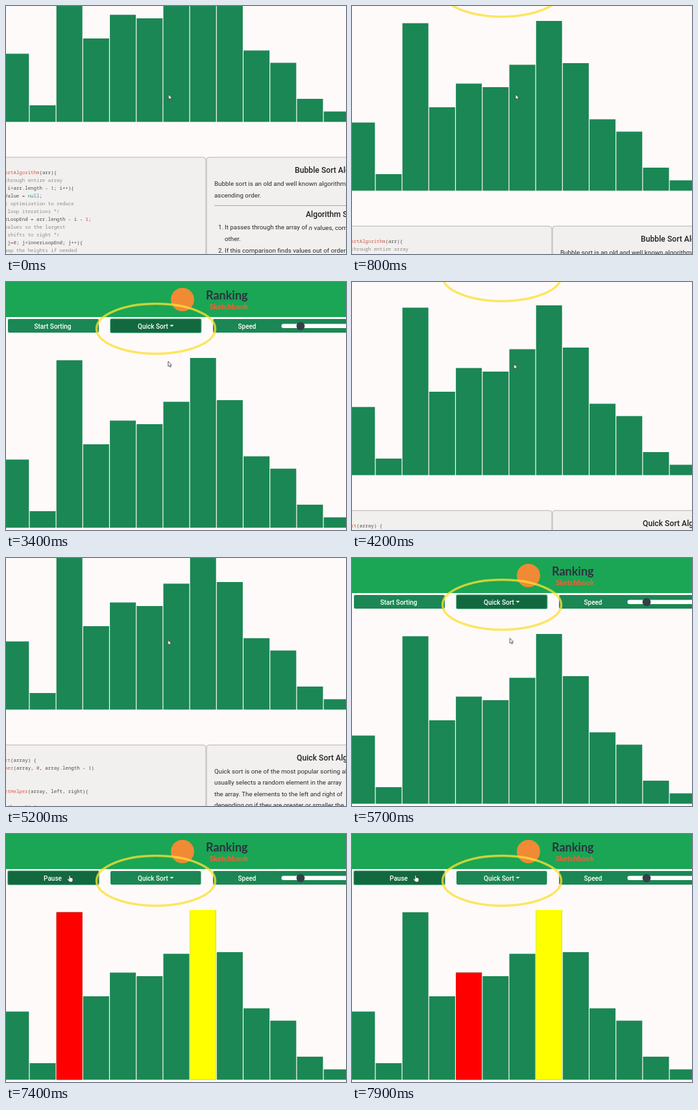
Recreate the animation shown at these times as an HTML page. Size 524 by 382 pixels, loop 8000 ms.

```html
<!DOCTYPE html>
<html lang="en">
<head>
<meta charset="utf-8">
<title>Sorting demo</title>
<style>
html, body { margin: 0; width: 100%; height: 100%; overflow: hidden; background: #fffafa; }
svg { display: block; width: 524px; height: 382px; }
text { font-family: Roboto, sans-serif; white-space: pre; dominant-baseline: central; }
.btn { fill: #1b8754; }
.dark { fill: #12693f; stroke: #1b8754; stroke-opacity: .5; stroke-width: 2; }
.label { font-size: 10px; font-weight: 500; fill: #fff; text-anchor: middle; }
.menu text { font: 7.8px "Open Sans", sans-serif; fill: #33383d; }
.card { fill: #f1f0ee; stroke: #b4b4b2; }
.code text { font: 7.42px "Noto Sans Mono", monospace; fill: #4a4a4a; }
.code .note { fill: #8b8b8b; }
.code .name { fill: #cf5a45; }
.code .num { fill: #b0358c; }
.code .null { fill: #2d8c9c; }
.title { font-size: 12.2px; font-weight: 500; fill: #222; }
.body { font-size: 9.8px; fill: #2b2b2b; }
</style>
</head>
<body>
<svg viewBox="0 0 524 382">
  <g id="page">
    <rect width="524" height="54" fill="#1aa654"/>
    <circle cx="272" cy="27" r="18" fill="#f08a35"/>
    <text x="308" y="20" style="font:700 18px Lato,sans-serif" fill="#2b3340">Ranking</text>
    <text x="314" y="37" style="font:700 11.3px Lato,sans-serif" fill="#f0623c">Sketchbook</text>

    <rect class="btn" x="3" y="57" width="140" height="21" rx="2"/>
    <rect class="btn" x="161" y="57" width="139.5" height="21" rx="2"/>
    <rect class="btn" x="319" y="57" width="230" height="21" rx="2"/>
    <rect class="dark" data-show="6200 8000" x="3" y="57" width="140" height="21" rx="2"/>
    <rect class="dark" data-show="1400 6600" x="161" y="57" width="139.5" height="21" rx="2"/>
    <text class="label" data-show="0 6600" x="72" y="68">Start Sorting</text>
    <text class="label" data-show="6600 8000" x="72" y="68">Pause</text>
    <g data-show="0 3300">
      <text class="label" x="226.5" y="68">Bubble Sort</text>
      <path d="M255 66h6l-3 3z" fill="#fff"/>
    </g>
    <g data-show="3300 8000">
      <text class="label" x="226.5" y="68">Quick Sort</text>
      <path d="M252.5 66h6l-3 3z" fill="#fff"/>
    </g>
    <text class="label" x="371.5" y="68">Speed</text>
    <rect x="424.5" y="64.5" width="120" height="6.5" rx="3" fill="#fff"/>
    <circle cx="454" cy="68" r="6.3" fill="#343f46"/>

    <g id="bars"></g>

    <rect class="card" x="-100" y="433" width="408" height="400" rx="4"/>
    <rect class="card" x="309" y="433" width="330" height="400" rx="4"/>
    <g id="bubble" data-show="0 3300"><path d="M321 507.5H560" stroke="#a9a9a7"/></g>
    <g id="quick" data-show="3300 8000"></g>

    <g class="menu" data-show="1700 3300">
      <rect x="220.5" y="80.5" width="79" height="55.5" rx="1.5" fill="#fff" stroke="#d2d2d0"/>
      <rect data-show="1900 2700" x="221" y="100" width="78" height="16" fill="#eceff1"/>
      <rect data-show="2700 3300" x="221" y="116" width="78" height="16" fill="#eceff1"/>
      <text x="228" y="92">Merge Sort</text>
      <text x="228" y="108">Bubble Sort</text>
      <text x="228" y="124">Quick Sort</text>
    </g>
    <ellipse cx="231" cy="72" rx="91.5" ry="38.5" fill="none" stroke="#fbe034" stroke-opacity=".78" stroke-width="3.5"/>
  </g>

  <g id="cursor" fill="#fff" stroke="#333" stroke-width=".8" stroke-linejoin="round">
    <path data-show="0 1400 3300 6100" d="M0 0V8L1.8 6.4 3 9 4.3 8.4 3.2 5.9H5.5z"/>
    <path data-show="1400 3300 6100 8000" d="M0 .8Q1 -.4 1.9 .8V4L5 4.7Q6 5 6 6V8.5L5 11H1L-2.5 7Q-2.6 5.5 -1.2 5.9L0 7z"/>
  </g>
</svg>
<script>
const LOOP = 8000, TICKS = 80, BASE = 378.5;
const $ = id => document.getElementById(id);

function add(parent, tag, attrs, text = "") {
  const el = document.createElementNS("http://www.w3.org/2000/svg", tag);
  for (const key in attrs) el.setAttribute(key, attrs[key]);
  el.textContent = text;
  parent.append(el);
  return el;
}

// The whole loop advances in 100 ms ticks, like a screen recording.
function play(el, frames) {
  el.animate(frames, { duration: LOOP, iterations: Infinity, easing: `steps(${TICKS}, end)` });
}

// Visible only between the given pairs of times, in ms.
function show(el, times) {
  const frames = [{ offset: 0, opacity: times[0] === 0 ? 1 : 0, easing: "step-end" }];
  let opacity = 0;
  for (const time of times) {
    opacity = 1 - opacity;
    if (time > 0 && time < LOOP) frames.push({ offset: time / LOOP, opacity, easing: "step-end" });
  }
  frames.push({ offset: 1, opacity: frames.at(-1).opacity });
  play(el, frames);
}

// Each stop is [time in ms, x, y].
function move(el, stops, easing = "linear") {
  play(el, stops.map(([time, x, y]) => ({
    offset: time / LOOP, transform: `translate(${x}px, ${y}px)`, easing
  })));
}

move($("page"), [
  [0, 0, -200], [500, 0, -200], [650, 0, -160], [800, 0, -94], [900, 0, -5], [1000, 0, 0],
  [3900, 0, 0], [4200, 0, -81], [4350, 0, -130], [4500, 0, -145],
  [5200, 0, -145], [5300, 0, -105], [5400, 0, -30], [5500, 0, 0], [LOOP, 0, 0]
]);
move($("cursor"), [
  [0, 250.5, 136], [800, 252, 136], [1100, 252, 136], [1500, 232, 68], [1750, 232, 68],
  [2100, 256, 105], [2500, 256, 105], [2900, 250, 121], [3300, 250, 121],
  [3600, 249.5, 126], [5600, 249.5, 126], [6300, 97, 63], [LOOP, 97, 63]
], "ease-in-out");

const tops = [273.5, 353, 120.5, 250, 213.5, 219, 184.5, 117, 182, 268.5, 287.5, 343, 362.5];
const SCAN = 6900, STEP = 220, PIVOT = 7;
function bar(i, fill) {
  const x = -4.7 + 41.2 * i;
  return add($("bars"), "rect", { x, y: tops[i], width: 40, height: BASE - tops[i], fill });
}
tops.forEach((_, i) => bar(i, "#1b8754"));
for (let i = 0; i < 5; i++) {
  const from = SCAN + STEP * i;
  show(bar(i, "#ff0000"), [from, from + STEP]);
}
show(bar(PIVOT, "#ffff00"), [SCAN, LOOP]);

// Lines that begin with "#" are comments.
function code(parent, lines) {
  const box = add(parent, "g", { class: "code" });
  lines.forEach((line, row) => {
    const el = add(box, "text", { x: -73, y: 456 + 12 * row });
    if (line[0] === "#") {
      el.setAttribute("class", "note");
      el.textContent = line.slice(1);
      return;
    }
    for (const part of line.split(/(\w*Sort\w*|\bnull\b|\b\d\b)/)) {
      const kind = /Sort/.test(part) ? "name" : part === "null" ? "null" : /^\d$/.test(part) ? "num" : "";
      add(el, "tspan", { class: kind }, part);
    }
  });
}
const title = (parent, x, y, text) => add(parent, "text", { class: "title", x, y }, text);
const body = (parent, x, y, text) => add(parent, "text", { class: "body", x, y }, text);

const bubble = $("bubble"), quick = $("quick");
code(bubble, [
  "function bubbleSortAlgorithm(arr){",
  "#    // Traverse through entire array",
  "    for(let i=0; i<arr.length - 1; i++){",
  "        let tempValue = null;",
  "#        /* Latest optimization to reduce",
  "#        count of loop iterations */",
  "        let innerLoopEnd = arr.length - i - 1;",
  "#        /* Swap values so the largest",
  "#        in array shifts to right */",
  "        for (let j=0; j<innerLoopEnd; j++){",
  "#            // swap the heights if needed"
]);
title(bubble, 445, 453, "Bubble Sort Algorithm");
body(bubble, 321, 473, "Bubble sort is an old and well known algorithm");
body(bubble, 321, 491, "ascending order.");
title(bubble, 462, 521, "Algorithm Steps");
body(bubble, 327, 540.5, "1.");
const first = body(bubble, 337, 540.5, "It passes through the array of ");
add(first, "tspan", { "font-style": "italic" }, "n");
add(first, "tspan", {}, " values, comparing");
body(bubble, 337, 558, "other.");
body(bubble, 327, 576, "2.");
body(bubble, 337, 576, "If this comparison finds values out of order");

code(quick, [
  "function quickSort(array) {",
  "    quickSortHelper(array, 0, array.length - 1)",
  "}",
  "",
  "function quickSortHelper(array, left, right){",
  "",
  "    if(array.length <= 1) {"
]);
title(quick, 448, 452.5, "Quick Sort Algorithm");
[
  "Quick sort is one of the most popular sorting algorithms",
  "usually selects a random element in the array",
  "the array. The elements to the left and right of",
  "depending on if they are greater or smaller the"
].forEach((line, i) => body(quick, 321, 473 + 17.5 * i, line));

document.querySelectorAll("[data-show]").forEach(el => show(el, el.dataset.show.split(" ").map(Number)));
</script>
</body>
</html>
```
